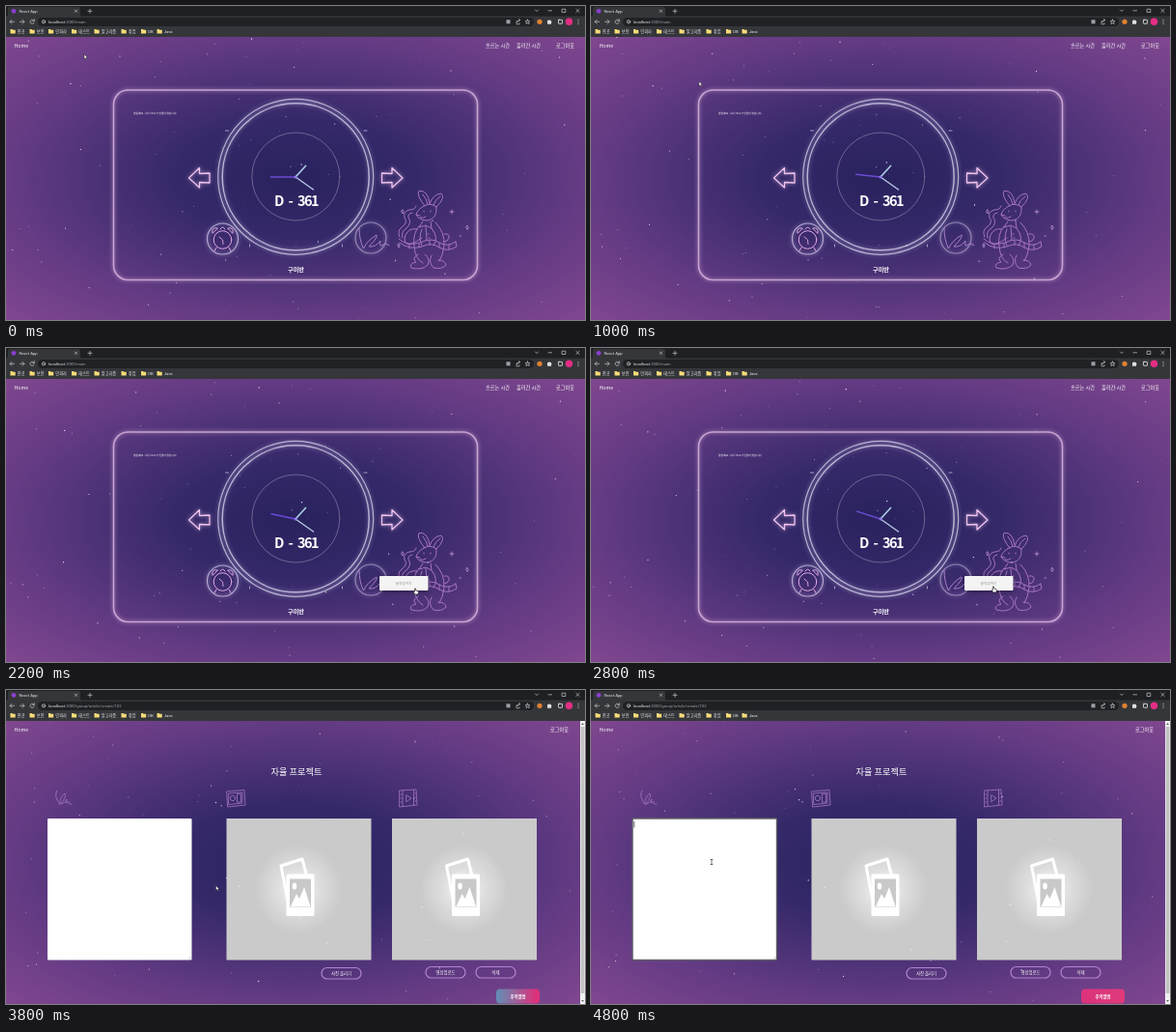
Animation, 600 px wide and 325 px high, one loop 5000 ms. Source, as an HTML page:

```html
<!DOCTYPE html>
<html>
<head>
<meta charset="utf-8">
<title>Star clock</title>
<style>
  html, body { margin: 0; width: 100%; height: 100%; overflow: hidden; background: #35363a; }
  svg { display: block; width: 600px; height: 325px; }
  text { font-family: "Noto Sans CJK KR", "Noto Sans CJK", "Noto Sans", sans-serif; fill: #fff; }
  .mid { text-anchor: middle; }
  .ui { font-family: Roboto, "Noto Sans CJK KR", sans-serif; font-size: 4.2px; fill: #e8eaed; }
  .line { fill: none; stroke-linecap: round; stroke-linejoin: round; }
  .tool { stroke: #c8cacd; stroke-width: .7; }
  .glow { filter: drop-shadow(0 0 2px rgba(205, 198, 232, .6)); }
  .halo { filter: drop-shadow(0 0 2px rgba(220, 205, 240, .75)); }
  .rose { filter: drop-shadow(0 0 2px rgba(226, 190, 226, .75)); }
  .ink { stroke: #a673c0; stroke-width: 1; }
  .faint { stroke: #9a6dbb; stroke-width: .9; }
  .pill { fill: #59377f; fill-opacity: .3; stroke: #b184cf; stroke-width: 1.2; }
</style>
</head>
<body>
<svg viewBox="0 0 600 325" xmlns="http://www.w3.org/2000/svg">
  <defs>
    <radialGradient id="night" gradientUnits="userSpaceOnUse" cx="0" cy="0" r="1"
      gradientTransform="translate(300 178) scale(424 207)">
      <stop offset="0" stop-color="#28225d"/>
      <stop offset=".3" stop-color="#36296a"/>
      <stop offset=".7" stop-color="#643b84"/>
      <stop offset="1" stop-color="#80478f"/>
    </radialGradient>
    <radialGradient id="shine">
      <stop offset="0" stop-color="#fff" stop-opacity=".95"/>
      <stop offset=".45" stop-color="#fff" stop-opacity=".4"/>
      <stop offset="1" stop-color="#fff" stop-opacity="0"/>
    </radialGradient>
    <linearGradient id="shift" gradientUnits="userSpaceOnUse" x1="508" y1="0" x2="688" y2="0">
      <stop offset="0" stop-color="#2cbcc1"/>
      <stop offset=".25" stop-color="#32b1cc"/>
      <stop offset=".56" stop-color="#dc327c"/>
      <stop offset="1" stop-color="#e0407a"/>
    </linearGradient>
    <clipPath id="view"><rect y="32" width="600" height="293"/></clipPath>
    <g id="photo">
      <rect x="228.500" y="133" width="150" height="146.500" fill="#cacaca"/>
      <circle cx="303" cy="206" r="46" fill="url(#shine)"/>
      <path d="M285 182 L307 175 L312 194 L294 228Z" class="line" stroke="#fff" stroke-width="3"/>
      <rect x="290.500" y="190.500" width="29" height="43.500" rx="1.500" fill="#fff"/>
      <rect x="294" y="195.500" width="22" height="29" fill="#c9c9c9"/>
      <path d="M295 224 L301 211 L304 216 L309 204 L315.500 224Z" fill="#fff"/>
      <ellipse cx="299" cy="203" rx="2.300" ry="3.600" fill="#fff"/>
    </g>
    <path id="arrow" d="M189.500 178 L200.500 167.500 V173.500 L211 173 V183 L200.500 182.500 V188Z"/>
    <path id="folder" d="M0 0 H2 L2.600 .7 H5.200 V4.600 H0Z" fill="#f7dc78"/>
  </defs>

  <g clip-path="url(#view)">
    <rect y="32" width="600" height="293" fill="url(#night)"/>
    <text x="8.500" y="42.600" font-size="5.200" font-weight="500">Home</text>

    <g id="main">
      <g font-size="5.200" font-weight="500">
        <text x="497" y="42.500">흐르는 시간</text>
        <text x="529" y="42.500">흘러간 시간</text>
        <text x="570" y="42.500">로그아웃</text>
      </g>
      <rect x="111.500" y="87" width="377" height="196.500" rx="15" class="line rose" stroke="#c9a3d2" stroke-width="1.600"/>
      <text x="132" y="112.300" font-size="2.800" font-weight="500">알림메모 : 회사 코드가 만들어졌습니다.</text>
      <g class="line glow" stroke="#b9b3d3">
        <circle cx="300.200" cy="176.800" r="80.500" stroke-width="1.200"/>
        <circle cx="300.200" cy="176.800" r="76" stroke-width="1.500"/>
      </g>
      <path d="M227.500 129 H230.500 M371 129 H374 M252.500 247 V249 M348.500 247 V249" class="line" stroke="#c8bfe6" stroke-width=".8"/>
      <circle cx="300.300" cy="176.500" r="45.500" class="line" stroke="#7d739f" stroke-width=".8"/>
      <g class="line">
        <path d="M300 177 L310.500 165.500" stroke="#a9cbe2" stroke-width="1.700"/>
        <path d="M300 177 L318.500 190" stroke="#b6c6e4" stroke-width="1.400"/>
        <path id="second" d="M300 177 V151.500" stroke="#6b4cd4" stroke-width="1.500"/>
        <circle cx="300" cy="177" r="1.500" fill="#8f77e8"/>
      </g>
      <text x="300.500" y="207.300" class="mid" font-size="14.500" font-weight="700" letter-spacing="-1.600" word-spacing="4">D - 361</text>
      <g class="line rose" stroke="#f0c3ee" stroke-width="1.300">
        <use href="#arrow"/>
        <use href="#arrow" transform="translate(600.500) scale(-1 1)"/>
      </g>
      <g class="line halo" stroke="#b5a9d2" stroke-width="1.200">
        <circle cx="224.500" cy="241" r="16"/>
        <circle cx="378" cy="240" r="16" opacity=".7"/>
      </g>
      <g class="line" stroke="#e3a9e4">
        <circle cx="224.500" cy="242" r="9.300"/>
        <path d="M214 235 Q212.500 228.500 219 230Z M235 235 Q236.500 228.500 230 230Z M222 231 Q224.500 227 227 231 M218 250 L216 253.500 M231 250 L233 253.500"/>
        <path d="M221 239 L224.500 242 L225 246.500" stroke-width=".9"/>
      </g>
      <path d="M366 230 Q366 242 370.500 251 Q374 243 384 237 Q386 239 376 249 Q383 250 388 243 Q387 249 389 248 L393 246 L397 247.500" class="line" stroke="#a77fc8"/>
      <text x="300.500" y="274.800" class="mid" font-size="6.200" font-weight="700">구미반</text>

      <g class="line ink">
        <path d="M434 207 Q425 196 428 191.500 Q437 190 439 204 M439 205 Q442 195 451 194 Q456 198 446 208 M432 195 Q436 200 437 205 M450 197 Q444 201 443 206"/>
        <path d="M433 207 Q426 211 425 216 Q428 222 437 222 Q447 220 446 208 Q439 203 433 207Z M433 212 v1 M440 212 v1 M425 216 l4 1 M429 219 q4 1 6-1"/>
        <path d="M432 223 l-4 6 7-2 6 3 -1-7 M435 228 l1 14 M428 228 Q421 236 423 249 Q424 262 432 266 M445 224 Q455 234 454 248 Q453 258 449 264 M431 231 Q427 241 431 248 M441 230 Q449 240 443 248"/>
        <path d="M426 231 Q418 229 414 237 Q411 246 418 247 Q426 244 431 240 M408 239 Q405 233 410 229 Q417 224 413 219 Q411 213 418 211 Q424 211 425 207 M411 240 Q409 233 415 230 Q421 224 417 219 Q416 215 421 214"/>
        <path d="M407 241 Q416 249 429 245 Q441 239 449 245 Q458 250 466 244 M408 245 Q418 253 431 249 Q441 244 449 250 Q458 255 467 249 L466 244 M418 247 v4 M428 246 v4 M439 243 v4 M449 245 v5 M459 247 v5"/>
        <path d="M427 257 Q420 261 425 265 Q417 267 420 271 Q431 274 437 268 Q440 262 434 257 M441 258 Q437 265 443 271 Q452 273 456 268 Q455 263 448 263 M454 236 q6-1 5 4 q-1 4-5 4 M437 236 h1 M438 240 h1"/>
      </g>
      <path d="M462 211 v4 M460 213 h4 M478 227.500 l1.200 2 -1.200 2 -1.200-2Z M411 211 l1.200 2 -1.200 2 -1.200-2Z M407 246 l1 2 -1 2 -1-2Z M470 238 h1.500" class="line" stroke="#c39ad6" stroke-width=".8"/>
    </g>

    <g id="write">
      <text x="564" y="42.500" font-size="5.200" font-weight="500">로그아웃</text>
      <text x="301" y="87.500" class="mid" font-size="9.200">자율 프로젝트</text>
      <g class="line faint">
        <path d="M53 104 Q49 110 56 118.500 Q55 112 61 107 Q63 110 57 118 Q62 117 63 113 Q61 120 65 115 Q64 119 68 118"/>
        <path d="M229 105 L247 103.500 L248 119 L230 121Z M231 107 L245 106 V117 L231 118.500Z M239.500 108 v8 h4 v-8Z"/>
        <circle cx="235" cy="112" r="2.700"/>
        <path d="M408 104 L425 103 L426 119 L408 121Z M411 104 V120.500 M422.500 103.500 V119 M415 109 L420 112 L415 115.500Z M409 108 h1 M409 112 h1 M409 116 h1 M424 107 h1 M424 111 h1 M424 115 h1"/>
      </g>
      <rect id="area" x="43" y="133" width="149.500" height="146.500" rx="1" fill="#fff"/>
      <path id="caret" d="M44.800 136 V142.500" stroke="#333" stroke-width=".7"/>
      <path d="M189.500 278.500 L191.500 276.500" stroke="#888" stroke-width=".5"/>
      <use href="#photo"/>
      <use href="#photo" x="171.500"/>
      <g class="pill">
        <rect x="327" y="287.500" width="41" height="11.500" rx="5.700"/>
        <rect x="435" y="286.500" width="41" height="11.500" rx="5.700"/>
        <rect x="487" y="286.500" width="41" height="11.500" rx="5.700"/>
      </g>
      <g class="mid" font-size="4.400">
        <text x="347.500" y="295.200">사진 올리기</text>
        <text x="455.500" y="294">영상업로드</text>
        <text x="507.500" y="294">삭제</text>
      </g>
      <rect x="508" y="309.500" width="45" height="15" rx="4" fill="url(#shift)"/>
      <text x="530.500" y="319.200" class="mid" font-size="4.400" font-weight="700">추억앨범</text>
    </g>

    <g id="stars" fill="#fff"></g>

    <g id="menu">
      <rect x="387" y="236" width="50.500" height="15" rx="1" fill="#f4f4f4" style="filter:drop-shadow(0 1px 2px rgba(0,0,0,.45))"/>
      <text x="412" y="245.300" class="mid" font-size="3.700" style="fill:#8d8d8d">글작성하기</text>
    </g>
    <g id="bar">
      <rect x="595" y="32" width="5" height="293" fill="#f1f1f1"/>
      <rect x="595.700" y="38" width="3.700" height="276" fill="#c2c2c2"/>
      <path d="M596 36 L597.500 34 L599 36Z M596 321 L597.500 323 L599 321Z" fill="#666"/>
    </g>
  </g>

  <g id="chrome">
    <rect width="600" height="11" fill="#1f2023"/>
    <path d="M0 11 Q2 11 2 9 V3 Q2 1 4 1 H75 Q77 1 77 3 V9 Q77 11 79 11Z" fill="#35363a"/>
    <rect y="10.500" width="600" height="21.500" fill="#35363a"/>
    <circle cx="8" cy="5.300" r="2.400" fill="#8a3fd0"/>
    <text x="13.500" y="6.800" class="ui">React App</text>
    <rect x="33" y="12" width="514" height="9" rx="4.500" fill="#202124"/>
    <g class="line tool">
      <path d="M71.300 4 l2.400 2.400 m0-2.400 l-2.400 2.400 M85 5.300 h4 m-2-2 v4 M548.500 4 l1.500 1.500 1.500-1.500 M562 4.800 h3.500 M576.500 3.200 h3.300 v3.300 h-3.300Z M590.800 3.200 l3.300 3.300 m0-3.300 l-3.300 3.300"/>
      <path d="M8.500 16.300 h-4.500 l2-2 m-2 2 l2 2 M14.500 16.300 h4.500 l-2-2 m2 2 l-2 2 M29 15.200 a2.100 2.100 0 1 0 .2 1.800 M29.300 13.700 v1.700 h-1.700"/>
      <circle cx="39" cy="16.300" r="1.700"/>
      <path d="M39 16 v1.200 M529 17.800 v-2 h1 m2 2 v1 h-3 M530 16.500 q.5-2 2.500-2 m-1-1 l1.200 1 -1.200 1 M540.500 14 l.7 1.600 1.700.1 -1.300 1.100 .5 1.700 -1.600-1 -1.500 1 .4-1.700 -1.200-1.100 1.600-.1Z"/>
    </g>
    <rect x="518.500" y="14.300" width="4" height="4" fill="#9aa0a6"/>
    <circle cx="553" cy="16.300" r="2.600" fill="#e2812f"/>
    <path d="M561 15 h1.300 q.7-1.800 1.400 0 h1.300 v1.200 q1.600.6 0 1.300 v1.300 h-4Z" fill="#dcdee0"/>
    <rect x="572.500" y="14.300" width="4" height="4" rx=".5" class="line" stroke="#e8eaed" stroke-width=".8"/>
    <circle cx="583.500" cy="16.300" r="3.700" fill="#e32e83"/>
    <path d="M593 14.300 v.1 M593 16.300 v.1 M593 18.300 v.1" class="line" stroke="#dcdee0"/>
    <text x="44" y="17.900" class="ui">localhost<tspan id="path" style="fill:#9aa0a6"></tspan></text>
    <g id="marks"></g>
  </g>

  <g id="cursor">
    <path id="point" d="M0 0 V4.800 L1.200 3.800 L2 5.600 L2.800 5.200 L2 3.600 H3.500Z" fill="#fff" stroke="#222" stroke-width=".5"/>
    <path id="hand" d="M-.6 0 Q0 -.8 .6 0 V2 L3 2.600 Q3.600 3 3.400 4 L2.800 6 H0 L-2 3.500 Q-1.800 2.700 -.6 3.600Z" fill="#fff" stroke="#111" stroke-width=".6"/>
    <path id="beam" d="M-1 -2.500 H1 M0 -2.500 V2.500 M-1 2.500 H1" class="line" stroke="#222" stroke-width=".6"/>
  </g>
</svg>
<script>
const LOOP = 5000, STEP = 200, SWAP = 3000;
const el = id => document.getElementById(id);
const show = (id, on) => { el(id).style.display = on ? "" : "none"; };
const set = (id, name, value) => el(id).setAttribute(name, value);

function add(parent, tag, attrs = {}) {
  const node = document.createElementNS("http://www.w3.org/2000/svg", tag);
  for (const name in attrs) node.setAttribute(name, attrs[name]);
  return el(parent).appendChild(node);
}

const marks = {
  전공: 4.5, 보안: 24.5, 인피라: 44, 테스트: 68, 알고리즘: 91.5, 취업: 119.500, DB: 140, Java: 156.5
};
for (const [name, x] of Object.entries(marks)) {
  add("marks", "use", { href: "#folder", x, y: 24 });
  add("marks", "text", { class: "ui", x: x + 7.3, y: 27.8 }).textContent = name;
}

// each row: time, then values
const mouse = [
  [0, 81, 50], [1000, 112, 78], [1800, 439, 257], [2200, 424, 249],
  [2800, 417, 247], [3000, 407, 246], [3800, 217.5, 202.5], [4400, 125, 178], [5000, 125, 178]
];
const hue = [[3000, 0], [3800, 60], [4800, 105], [5000, 112]];

function at(rows, t) {
  let i = 1;
  while (i < rows.length - 1 && rows[i][0] < t) i++;
  const a = rows[i - 1], b = rows[i];
  const k = Math.min(1, Math.max(0, (t - a[0]) / (b[0] - a[0])));
  return a.slice(1).map((v, n) => v + (b[n + 1] - v) * k);
}

function random(seed) {
  return () => (seed = seed * 16807 % 2147483647) / 2147483647;
}

// x, y, speed x, speed y in pixels per second
const lead = [
  [97, 165, 4.7, -6.4], [118, 52, 7.6, -2.8], [170, 297, -3, 4],
  [61.5, 230, -.9, -3.8], [461, 67, .4, .6], [455, 277, 4.4, 5]
];

function sky(seed, count, first) {
  const rnd = random(seed);
  return Array.from({ length: count }, (_, i) => {
    const turn = rnd() * Math.PI * 2, speed = 1 + rnd() * 7;
    const spot = first[i] || [rnd() * 600, 32 + rnd() * 293, Math.cos(turn) * speed, Math.sin(turn) * speed];
    return { spot, r: .3 + rnd() * .4, alpha: first[i] ? .95 : .3 + rnd() * .65 };
  });
}
const skies = [sky(4127, 85, lead), sky(90211, 85, [])];
const dots = skies[0].map(() => add("stars", "circle"));

function drawStars(list, seconds) {
  list.forEach(({ spot: [x, y, vx, vy], r, alpha }, i) => {
    const dot = dots[i];
    dot.setAttribute("cx", x + vx * seconds);
    dot.setAttribute("cy", y + vy * seconds);
    dot.setAttribute("r", r);
    dot.setAttribute("opacity", alpha);
  });
}

function draw(t) {
  const second = t >= SWAP, menu = t >= 2200 && !second, typing = t >= 4200;
  const focus = t >= 4600;
  show("main", !second);
  show("write", second);
  show("bar", second);
  show("menu", menu);
  el("path").textContent = second ? ":3000/group/article/create/102" : ":3000/main";

  drawStars(skies[+second], (second ? t - SWAP : t) / 1000);

  const ticks = Math.floor((t + 400) / 1000);
  set("second", "transform", `rotate(${270 + ticks * 6} 300 177)`);

  set("shift", "gradientTransform", `translate(${-at(hue, t)[0]})`);
  set("area", "stroke", focus ? "#5d5d66" : "none");
  set("area", "stroke-width", 1.4);
  show("caret", focus);

  const [x, y] = at(mouse, t);
  set("cursor", "transform", `translate(${x} ${y})`);
  show("hand", menu);
  show("beam", typing);
  show("point", !menu && !typing);
}

function frame() {
  const t = performance.now() % LOOP;
  draw(Math.floor((t + 1) / STEP) * STEP % LOOP);
  requestAnimationFrame(frame);
}
frame();
</script>
</body>
</html>
```
